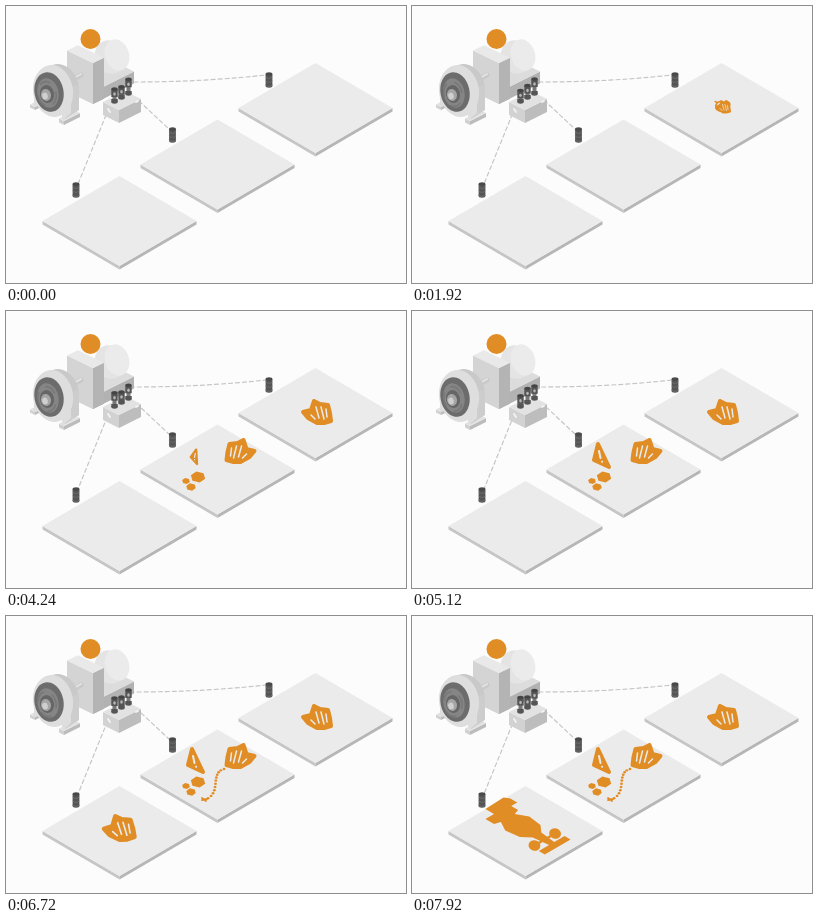
Animation of 400 by 277 pixels, one loop 8000 ms. Source, as an HTML page with a canvas:

```html
<!DOCTYPE html>
<html lang="en">
<head>
<meta charset="utf-8">
<style>
html, body { margin: 0; width: 100%; height: 100%; overflow: hidden; background: #fcfcfc; }
canvas { display: block; width: 400px; height: 277px; }
</style>
</head>
<body>
<canvas id="stage"></canvas>
<script>
const LOOP = 8000, STEP = 80, TAU = Math.PI * 2;
const ORANGE = '#e18d25', PALE = '#ebebeb', DARK = '#555';
const canvas = document.getElementById('stage');
const ratio = window.devicePixelRatio || 1;
canvas.width = 400 * ratio;
canvas.height = 277 * ratio;
const c = canvas.getContext('2d');

const clamp = v => Math.max(0, Math.min(1, v));
const ease = v => v * v * (3 - 2 * v);
const span = (t, from, to) => ease(clamp((t - from) / (to - from)));
// floor plan (u towards the lower right, v towards the upper right) to screen
const iso = (u, v) => [0.86 * (u + v), 0.5 * (u - v)];

function poly(fill, points) {
  c.beginPath();
  for (const [x, y] of points) c.lineTo(x, y);
  c.closePath();
  c.fillStyle = fill;
  c.fill();
}

function oval(fill, x, y, rx, ry, turn = 0) {
  c.beginPath();
  c.ellipse(x, y, rx, ry, turn, 0, TAU);
  c.fillStyle = fill;
  c.fill();
}

function stroke(path, width, color = ORANGE) {
  c.strokeStyle = color;
  c.lineWidth = width;
  c.lineCap = c.lineJoin = 'round';
  c.stroke(new Path2D(path));
}

function place(x, y, scale, turn, draw, flip = 1) {
  if (scale <= 0) return;
  c.save();
  c.translate(x, y);
  c.rotate(turn);
  c.scale(scale * flip, scale);
  draw();
  c.restore();
}

// x, y is the nearest corner of the lid; l and r run to the left and right
function box(x, y, l, r, h, [top, left, right], slope = 0.5) {
  const a = y - l * slope, b = y - r * slope;
  poly(left, [[x - l, a], [x, y], [x, y + h], [x - l, a + h]]);
  poly(right, [[x, y], [x + r, b], [x + r, b + h], [x, y + h]]);
  poly(top, [[x, y], [x - l, a], [x - l + r, a + b - y], [x + r, b]]);
}

function panel(x, y) {
  box(x, y + 45, 77, 77, 3.6, [PALE, '#c6c6c6', '#b6b6b6'], 45 / 77);
}

function post(x, y) {
  c.fillStyle = DARK;
  c.fillRect(x - 3.4, y - 6, 6.8, 12);
  oval(DARK, x, y + 6, 3.4, 1.7);
  for (let i = 0; i < 3; i++) {
    c.beginPath();
    c.ellipse(x, y - 3 + i * 4, 3.2, 1.4, 0, 0, Math.PI);
    c.strokeStyle = '#777';
    c.lineWidth = 0.6;
    c.stroke();
  }
  oval('#494949', x, y - 6, 3.4, 1.7);
}

function wires(t) {
  c.save();
  c.setLineDash([4, 3]);
  c.lineDashOffset = -t * 0.014;
  c.lineWidth = 1.2;
  c.strokeStyle = '#c6c6c6';
  for (const d of ['M128 76Q196 76 260 69', 'M133 95L164 124', 'M100 109L72 178'])
    c.stroke(new Path2D(d));
  c.restore();
}

function flywheel(t) {
  const foot = ['#e2e2e2', '#d0d0d0', '#bcbcbc'];
  box(29, 101, 5, 6, 3, foot);
  box(58, 115, 5, 16, 4, foot);
  oval('#c9c9c9', 53, 83, 20, 25, -0.15);
  poly('#cdcdcd', [[58, 84], [73, 78], [73, 104], [59, 113]]);
  oval('#dedede', 47, 85, 20, 26, -0.15);
  poly('#dedede', [[28, 84], [40, 84], [36, 99], [28, 101]]);
  poly('#dedede', [[50, 85], [65, 82], [65, 107], [57, 114]]);
  oval('#6c6c6c', 43, 86, 14.5, 20, -0.2);
  oval('#858585', 42, 87, 10.5, 15, -0.2);
  const start = t / LOOP * TAU * 9;
  for (let i = 0; i < 3; i++) {
    const a = start + i * TAU / 3;
    c.beginPath();
    c.ellipse(41, 88, 9, 12.5, -0.2, a, a + 1.1);
    c.strokeStyle = '#777';
    c.lineWidth = 1.5;
    c.stroke();
  }
  oval('#666', 41, 88, 7, 9, -0.2);
  oval('#a5a5a5', 40, 89, 5, 6, -0.2);
  oval('#cfcfcf', 39, 90, 2.8, 3.4, -0.2);
}

function piston(x, y, lift) {
  c.fillStyle = '#777';
  c.fillRect(x - 2, y - 4 + lift, 4, 11 - lift);
  c.fillStyle = DARK;
  c.fillRect(x - 3.2, y - 6 + lift, 6.4, 8);
  c.fillRect(x - 3.2, y + 4, 6.4, 3);
  oval('#444', x, y - 6 + lift, 3.2, 1.7);
  oval(DARK, x, y + 7, 3.2, 1.7);
  oval('#b5b5b5', x, y - 1 + lift, 1.3, 1.7);
}

function machine(t) {
  box(87, 86, 26, 41, 12, ['#dcdcdc', '#d2d2d2', '#b2b2b2']);
  oval('#e4e4e4', 104, 51, 15, 17, -0.4);
  oval(PALE, 111, 49, 12, 16, -0.3);
  box(87, 57, 26, 11, 41, ['#e9e9e9', '#d4d4d4', '#b4b4b4'], 0.48);
  stroke('M66 74L75 69', 5, '#c9c9c9');
  stroke('M66 73L75 68', 2, '#e4e4e4');
  flywheel(t);
  box(113, 104, 16, 22, 13, ['#e2e2e2', '#d2d2d2', '#bdbdbd']);
  stroke('M102 103L104 106M130 96L132 95', 1.8, '#f4f4f4');
  for (let i = 2; i >= 0; i--)
    piston(108.5 + i * 7, 89 - i * 4, 2 * Math.sin(t / LOOP * TAU * 13 + i * 2.1));
  oval(ORANGE, 84.5, 33, 10, 10);
}

function kart() {
  const hull = 'M-14 0L-6 -2L-3 -11L3 -8L11 -7L13 1L14 9L7 11L0 11L-9 6Z';
  c.fillStyle = ORANGE;
  c.fill(new Path2D(hull));
  stroke(hull, 4);
  stroke('M-6 3L-2 7M-1 -5L2 6M4 -5L7 7M9 -3L10 5', 1.5, PALE);
}

function looseParts(t) {
  const join = span(t, 1440, 2080);
  let count = 0;
  const part = (u, v, draw) => {
    const begin = 240 + 35 * count++;
    const [x, y] = iso(u * (1 - join), v * (1 - join));
    place(311 + x, 100 + y, span(t, begin, begin + 240) * (1 - join * 0.55), 0, draw);
  };
  const dot = (rx, ry, turn) => () => oval(ORANGE, 0, 0, rx, ry, turn);
  part(-37, -1, () => stroke('M-5 -3L-1 -1L6 -4M-1 -1L-4 4', 3));
  for (const side of [-1, 1]) {
    part(-20, 4 * side, dot(1.5, 4, 1));
    for (let k = -1; k <= 1; k++) part(7 * k, (12 + 9 * k * k) * side, dot(2.5, 3.4, 0.5));
    for (const k of [-1, 1]) part(7 * k - 1, 33 * side, dot(4.2, 5, -0.45));
    part(36, 6 * side, dot(1.5, 2.6, -0.8));
  }
  part(-2, -1, () => stroke('M-2 -4C-4 0 0 4 4 3', 4));
  part(24, 0, () => stroke('M-6 4L0 4L5 1M0 4L-3 -6M0 4L3 6', 3));
}

function rock(x, y, r) {
  const corners = [];
  for (let i = 0; i < 6; i++) {
    const a = i * TAU / 6 + 0.3;
    corners.push([x + r * Math.cos(a), y + r * 0.75 * Math.sin(a)]);
  }
  poly(ORANGE, corners);
}

function rocks() {
  rock(4, -4, 7.5);
  rock(-8, 0, 4);
  rock(-3, 6, 5);
}

function sign() {
  const edge = 'M-3 -13L-7 3L8 10Z';
  c.fillStyle = ORANGE;
  c.fill(new Path2D(edge));
  stroke(edge, 4);
  stroke('M-2 -6L-0.5 1M1 4.6L1.1 4.7', 2, PALE);
}

function trail(amount) {
  const at = (u, a, b, p, q) => {
    const v = 1 - u;
    return v * v * v * a + 3 * v * v * u * b + 3 * v * u * u * p + u * u * u * q;
  };
  for (let i = 0; i < 12; i++) {
    const u = i / 12;
    if (u < amount) oval(ORANGE, at(u, 218, 203, 217, 198), at(u, 153, 157, 178, 184), 1.4, 1.2);
  }
  if (amount > 0.95) stroke('M196 182L200 185M201 183L196 184', 1.8);
}

function racer() {
  // half of the plan, mirrored along the axis
  const half = [[-32, 14], [-22, 14], [-20, 8], [-9, 14], [6, 12], [14, 5], [31, 3], [31, 15], [38, 15]];
  const other = half.map(([u, v]) => [u, -v]).reverse();
  poly(ORANGE, [...half, ...other].map(p => iso(...p)));
  poly(ORANGE, [[-42, -4], [-43, 18], [-38, 21], [-30, 21], [-30, -4]].map(p => iso(...p)));
  for (const side of [-1, 1]) {
    const [x, y] = iso(23, 12 * side);
    stroke(`M${iso(23, 0)}L${[x, y]}`, 2.4);
    oval(ORANGE, x, y, 6, 5.2, 0.3);
  }
}

function draw(t) {
  c.setTransform(ratio, 0, 0, ratio, 0, 0);
  c.fillStyle = '#fcfcfc';
  c.fillRect(0, 0, 400, 277);
  for (let i = 0; i < 3; i++) panel(309.5 - 98 * i, 102 + 56.5 * i);
  wires(t);
  machine(t);

  if (t < 2080) looseParts(t);
  place(311, 101, span(t, 1680, 2160), 0, kart);
  place(234.5, 140, span(t, 2320, 3040), 0, kart, -1);
  place(188, 170, span(t, 3360, 3920), 0, rocks);
  const rise = span(t, 3760, 4640);
  place(189, 146, rise, 0.9 * (1 - rise), sign);
  trail(span(t, 5200, 6240));

  const morph = span(t, 6880, 7600);
  if (morph < 0.5) place(113, 212, span(t, 6160, 6640) * (1.08 + morph * 0.6), -0.05, kart);
  else place(113, 212, 0.2 + 0.8 * morph, 0, racer);

  for (let i = 0; i < 3; i++) post(263 - 96.5 * i, 74 + 55 * i);
}

function tick(now) {
  draw(Math.floor((now % LOOP) / STEP) * STEP);
  requestAnimationFrame(tick);
}
draw(0);
requestAnimationFrame(tick);
</script>
</body>
</html>
```
